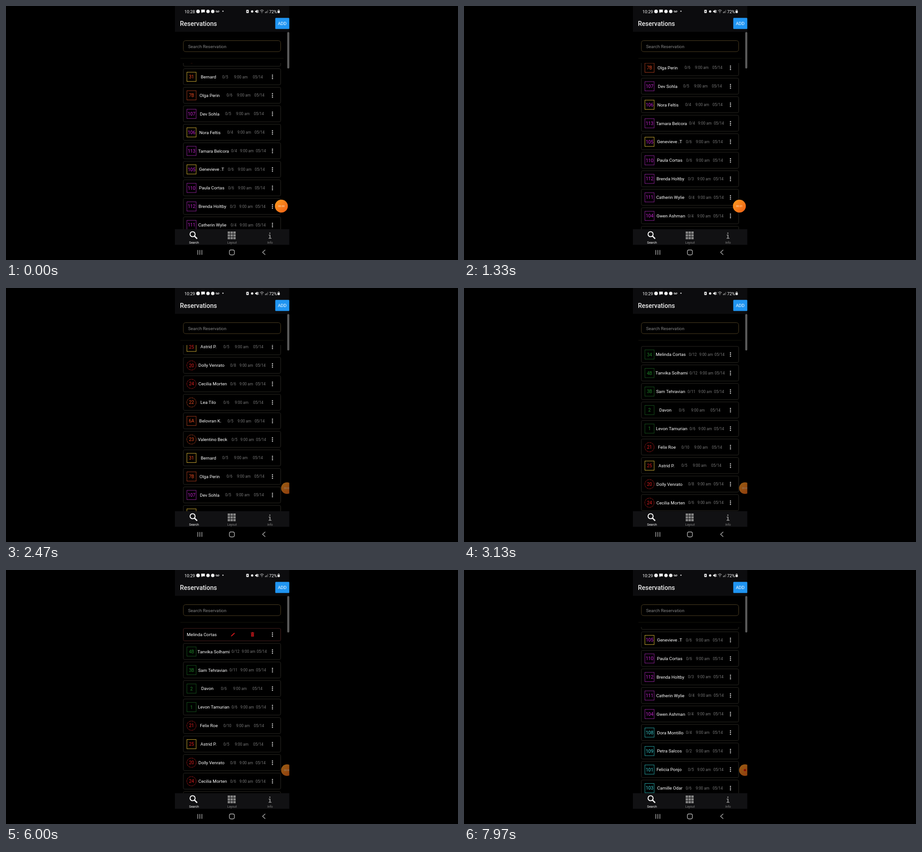
An HTML page for the animation above (8 s loop, 998 px wide and 561 px high).

```html
<!DOCTYPE html>
<html lang="en">
<head>
<meta charset="utf-8">
<title>Reservations</title>
<style>
  html, body { margin: 0; width: 100%; height: 100%; overflow: hidden; background: #000; }
  svg { display: block; width: 100vw; height: 100vh; }
  text { font-family: Roboto, "Open Sans", sans-serif; fill: #fff; }
  .mid { text-anchor: middle; }
  .name { font-size: 9.8px; }
  .info { font-size: 8.4px; fill: #777; }
  .badge { font-size: 10px; text-anchor: middle; }
  .tab { font-size: 7px; text-anchor: middle; }
  .gray { fill: #858585; }
  .card { fill: none; stroke: #2b2923; }
  .line { fill: none; stroke: #b0b0b0; stroke-width: 1.4; stroke-linecap: round; stroke-linejoin: round; }
</style>
</head>
<body>
<svg viewBox="0 0 998 561">
  <defs>
    <clipPath id="listClip"><rect x="373" y="126" width="253" height="367"/></clipPath>
    <clipPath id="phoneClip"><rect x="373" y="0" width="252.5" height="561"/></clipPath>
    <linearGradient id="orange" x1="0" y1="0" x2="1" y2="1">
      <stop offset="0" stop-color="#ff9c20"/><stop offset="1" stop-color="#ee5f16"/>
    </linearGradient>
  </defs>

  <!-- status bar and header -->
  <rect x="373" y="0" width="252.5" height="57" fill="#0c0c0e"/>
  <text id="clock" x="394" y="15.5" font-size="9.4"></text>
  <g fill="#eee">
    <circle cx="424" cy="12" r="4"/>
    <path d="M431 8h8v6h-5l-2 2v-2h-1z"/>
    <circle cx="446" cy="12" r="3.8"/><circle cx="456.5" cy="12" r="3.8"/>
    <circle cx="479" cy="11.5" r="1.3"/>
    <rect x="530.5" y="8.5" width="5.5" height="7" rx="1"/>
    <circle cx="543.5" cy="12" r="2.6"/>
    <path d="M550 10.5h2l3-2.5v8l-3-2.5h-2z"/>
    <rect x="599.5" y="10.5" width="5" height="5" rx="1"/>
  </g>
  <g fill="none" stroke="#ddd">
    <path d="M464.5 13.3h5M555 9l3 6M558 9l-3 6"/>
    <circle cx="464.8" cy="11.8" r="1.5"/><circle cx="469.2" cy="11.8" r="1.5"/>
    <path d="M561 10.5q4-3.6 8 0M562.8 12.6q2.2-2 4.4 0M565 14v1.5"/>
    <path d="M572.5 15.5v-2M574.5 15.5v-3.5" />
    <path d="M576.5 15.5v-5M578 15.5v-7" stroke="#666"/>
    <path d="M600.5 10.5v-1.5q1.5-1.5 3 0v1.5"/>
  </g>
  <circle cx="533.2" cy="12" r="1.2" fill="#222"/>
  <text x="581" y="15.5" font-size="9.4">72%</text>
  <text x="384" y="44" font-size="14" font-weight="500" style="fill:#ececec">Reservations</text>
  <rect x="594.5" y="26.3" width="31" height="24.5" rx="1.5" fill="#2095f2"/>
  <text class="mid" x="609.8" y="42.3" font-size="9.8">ADD</text>
  <rect x="621" y="57.5" width="4.5" height="80.5" rx="2" fill="#5b5b5b"/>

  <!-- search field -->
  <rect x="391.5" y="76.5" width="215" height="24.3" rx="5" fill="none" stroke="#4d3f22"/>
  <text class="gray" x="402" y="92.6" font-size="9.9">Search Reservation</text>
  <path d="M385 115.5H613" stroke="#16150d"/>

  <g clip-path="url(#listClip)"><g id="list"></g></g>

  <!-- tab bar -->
  <rect x="373" y="493" width="252.5" height="34.5" fill="#111113"/>
  <g fill="none" stroke="#fff" stroke-width="2">
    <circle cx="412" cy="504" r="5.6"/><path d="M416 508l6 6" stroke-width="2.6"/>
  </g>
  <text class="tab" x="415" y="525">Search</text>
  <g id="grid" fill="#858585"></g>
  <text class="tab gray" x="499" y="525">Layout</text>
  <path d="M581.3 500.5h2.6v2.4h-2.6zM580 505h4v7.3h2.2v1.7h-6.4v-1.7h2v-5.6h-1.8z" fill="#858585"/>
  <text class="tab gray" x="583" y="525">Info</text>

  <!-- system buttons -->
  <g class="line">
    <path d="M423.5 539.5v9.5M428 539.5v9.5M432.5 539.5v9.5M572 539l-5.5 5 5.5 5"/>
    <rect x="493.3" y="538.7" width="11" height="11" rx="3.4"/>
  </g>

  <!-- recorder bubble -->
  <g clip-path="url(#phoneClip)"><g id="bubble">
    <circle r="14.3" fill="url(#orange)"/>
    <text id="timer" class="mid" y="2" font-size="5.8" style="fill:#ffe6cc"></text>
    <circle id="dot" r="2.8" fill="#d8140c"/>
  </g></g>
</svg>

<script>
const LOOP = 8000, PITCH = 40.9, TOP = 147;
const $ = id => document.getElementById(id);
const clamp = v => Math.min(1, Math.max(0, v));
const part = (t, a, b) => clamp((t - a) / (b - a));

// badge looks: [text, border]
const green = ['#1f8428', '#17501c'], red = ['#e01e1e', '#981818'], flame = ['#f04c20', '#a03a1c'],
      purple = ['#cc24d6', '#8c2296'], cyan = ['#3cd6da', '#259f9f'], gold = '#ccaa34';
const goldRed = [red[0], gold], goldFlame = [flame[0], gold], goldPurple = [purple[0], gold];

// badge, name, guests, x of the guest count, look, round badge
const rows = [
  ['34', 'Melinda Cortas', 12, 496.5, green], ['4B', 'Tanvika Solhami', 12, 498, green],
  ['3B', 'Sam Tehravian', 11, 493.5, green], ['2', 'Davon', 6, 474.5, green],
  ['1', 'Levon Tamurian', 6, 498, green], ['21', 'Felix Roe', 10, 480, red, 1],
  ['25', 'Astrid P.', 5, 480, goldRed], ['20', 'Dolly Venrato', 8, 495, red, 1],
  ['24', 'Cecilia Morten', 6, 495, red, 1], ['22', 'Lea Tilo', 6, 480, flame, 1],
  ['6A', 'Belovran K.', 5, 489, flame], ['23', 'Valentino Beck', 5, 498, flame, 1],
  ['31', 'Bernard', 5, 477.5, goldFlame], ['7B', 'Olga Perin', 6, 487, flame],
  ['107', 'Dev Sohla', 5, 484, purple], ['106', 'Nora Feltis', 4, 488.5, goldPurple],
  ['113', 'Tamara Belcora', 4, 497, purple], ['105', 'Genevieve .T', 6, 490, goldPurple],
  ['110', 'Paula Cortas', 6, 490.5, purple], ['112', 'Brenda Holtby', 3, 494.5, purple],
  ['111', 'Catherin Wylie', 4, 496, purple], ['104', 'Gwen Ashman', 4, 494, purple],
  ['108', 'Dora Montillo', 4, 490, cyan], ['109', 'Petra Salcos', 2, 490, cyan],
  ['101', 'Felicia Ponjo', 5, 494.5, cyan], ['103', 'Camille Odar', 6, 489.5, cyan]
];

const dots = y => [-3.8, 0, 3.8].map(d => `<circle cx="588.3" cy="${y + d}" r="1.25" fill="#ddd"/>`).join('');

function rowMarkup([badge, name, guests, x, [ink, edge], round], i) {
  const d = x - 477.5, wide = guests > 9 ? 1 : 0;
  const frame = round
    ? `<circle cx="409.5" r="10.3" fill="none" stroke="${edge}" stroke-dasharray="5 1"/>`
    : `<rect x="399.4" y="-10.3" width="20.4" height="20.4" fill="none" stroke="${edge}"/>`;
  const info = (at, text) => `<text class="info" x="${at}" y="3">${text}</text>`;
  return `<g class="row"><rect class="card" x="391.5" y="-18" width="215" height="35.5" rx="3"/><g class="body">
    ${frame}<text class="badge" x="409.6" y="3.6" style="fill:${ink}">${badge}</text>
    <text class="name" x="${430 - d * .3 - wide}" y="3.4">${name}</text>
    ${info(x, '0/' + guests)}${info(503.5 + d * .68 + wide * 3, '9:00 am')}${info(545 + d * .34 + wide * 1.5, '05/14')}
    ${dots(0)}</g>${i ? '' : editMarkup(name)}</g>`;
}

const editMarkup = name => `<g id="edit">
  <text class="name" x="399" y="-.6">${name}</text>
  <path d="M496.5 0l1-2.5 6.5-6 1.3 1.4-6.4 6z" fill="#d3181c"/>
  <path d="M540.5-8h7.5M542.8-9h3" stroke="#c3181c" stroke-width="1.3"/>
  <path d="M541.3-6.5h6v6.5h-6z" fill="#c3181c"/>
  <path d="M543.3-5v4M545.3-5v4" stroke="#400" stroke-width=".8"/>
  ${dots(-4.2)}</g>`;

$('list').innerHTML = rows.map(rowMarkup).join('');
$('grid').innerHTML = [0, 1, 2].flatMap(r => [0, 1, 2].map(c =>
  `<rect x="${489.5 + c * 6.2}" y="${498 + r * 6.1}" width="5.2" height="5"/>`)).join('');

const rowEls = [...document.querySelectorAll('.row')];
const firstCard = rowEls[0].querySelector('.card'), firstBody = rowEls[0].querySelector('.body');

// flings: start, end, new offset, decay power
const flings = [[400, 1000, 594.9, 3], [1230, 2450, 263.3, 2], [2470, 3030, 0, 2], [6600, 7700, 680, 2]];
function scrollAt(t) {
  let pos = 481.3;
  for (const [a, b, to, power] of flings) pos += (to - pos) * (1 - (1 - part(t, a, b)) ** power);
  return pos;
}

function draw(t) {
  const pos = scrollAt(t), open = part(t, 3770, 3970);
  rowEls.forEach((el, i) =>
    el.setAttribute('transform', `translate(0 ${TOP + i * PITCH - pos - (i ? 7.7 * open : 0)})`));
  firstCard.setAttribute('height', 35.5 - 8 * open);
  firstCard.style.stroke = open ? '#49201f' : '';
  firstBody.setAttribute('opacity', 1 - open);
  $('edit').setAttribute('opacity', open);

  $('clock').textContent = t < 30 ? '10:28' : '10:29';
  const live = t < 7930;
  $('timer').textContent = live ? '00:0' + Math.floor(t / 1000) : '';
  $('dot').setAttribute('opacity', live ? 0 : 1);

  // the idle bubble shrinks, dims and docks at the screen edge
  const idle = part(t, 1450, 1750), x = 608 + 12.3 * part(t, 1500, 2300);
  $('bubble').setAttribute('transform', `translate(${x} 442) scale(${1 - .1 * idle})`);
  $('bubble').setAttribute('opacity', 1 - .4 * idle);
}

function tick() {
  draw(performance.now() % LOOP);
  requestAnimationFrame(tick);
}
tick();
</script>
</body>
</html>
```
